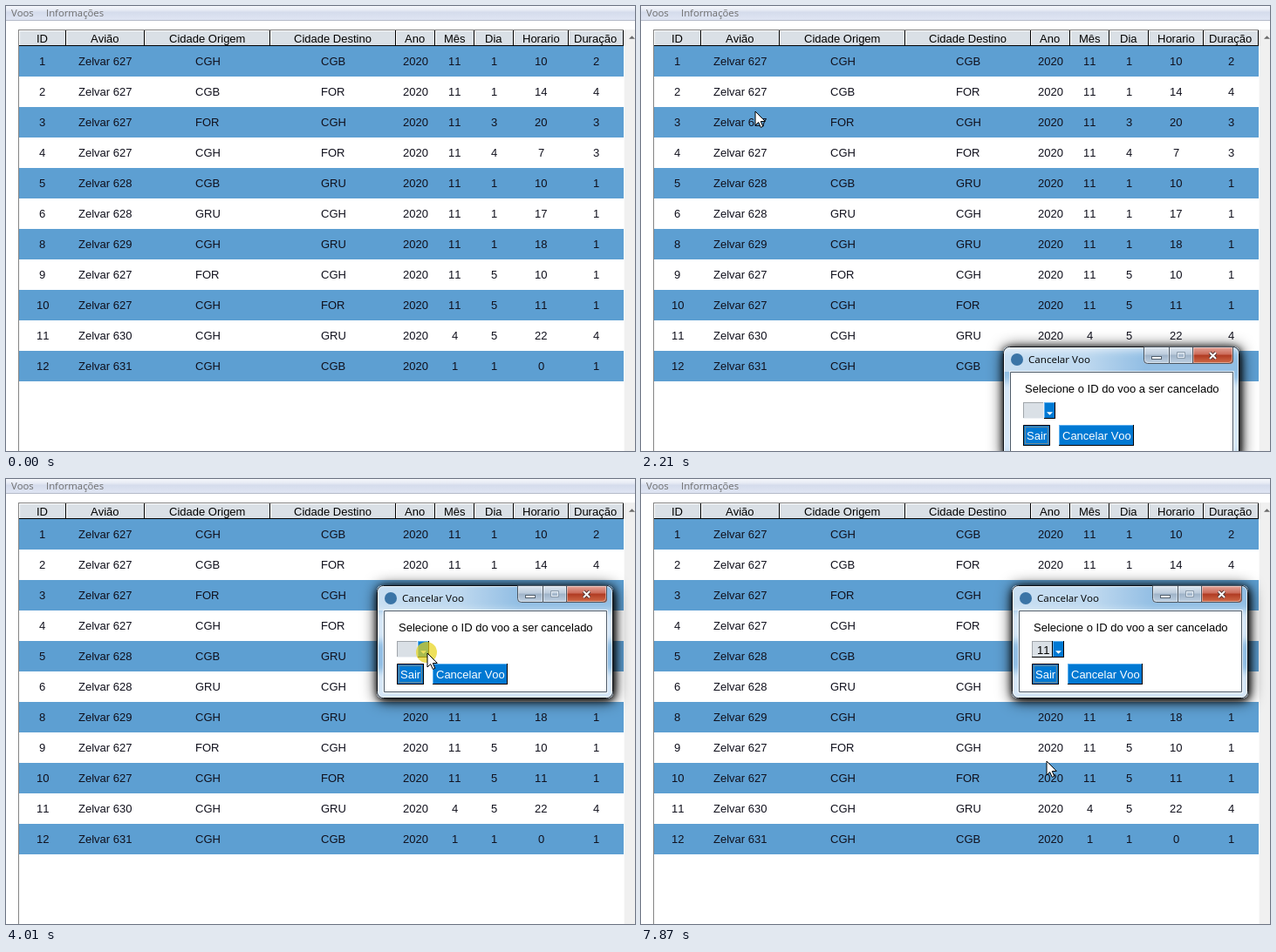
Write an HTML page with a canvas that moves like this. It is 721 px wide and 511 px high and loops after 8 s.

```html
<!DOCTYPE html>
<html lang="pt">
<head>
<meta charset="utf-8">
<title>Voos</title>
<style>
html, body { margin: 0; width: 100%; height: 100%; overflow: hidden; background: #fff; }
canvas { display: block; }
</style>
</head>
<body>
<canvas id="stage" width="721" height="511"></canvas>
<script>
const ctx = document.getElementById('stage').getContext('2d');
ctx.fontKerning = 'none';
const LOOP = 8000;
const TABLE_FONT = '13px "Liberation Sans", Arial, sans-serif';
const MENU_FONT = '11.3px "Open Sans", "Noto Sans", sans-serif';
const TITLE_FONT = '11.6px "Open Sans", "Noto Sans", sans-serif';
const STRIPE = '#5d9fd2', FIELD = '#dae0e6', BUTTON = '#0079d3', SELECT = '#3399ff';

const edges = [15, 69, 159, 303, 447, 492, 537, 582, 645, 708];
const headers = ['ID', 'Avião', 'Cidade Origem', 'Cidade Destino', 'Ano', 'Mês', 'Dia', 'Horario', 'Duração'];
const flights = `1 627 CGH CGB 11 1 10 2
2 627 CGB FOR 11 1 14 4
3 627 FOR CGH 11 3 20 3
4 627 CGH FOR 11 4 7 3
5 628 CGB GRU 11 1 10 1
6 628 GRU CGH 11 1 17 1
8 629 CGH GRU 11 1 18 1
9 627 FOR CGH 11 5 10 1
10 627 CGH FOR 11 5 11 1
11 630 CGH GRU 4 5 22 4
12 631 CGH CGB 1 1 0 1`.split('\n').map(line => {
  const [id, plane, from, to, ...rest] = line.split(' ');
  return [id, 'Zelvar ' + plane, from, to, '2020', ...rest];
});
const ids = flights.map(f => f[0]);

// Each step: time, pointer x, pointer y, changes. Changes persist, except "press".
const YELLOW = 'rgba(232,212,28,.72)', ORANGE = 'rgba(255,186,58,.75)';
const steps = [
  [0, -50, -50, {}],
  [380, 616, 452],
  [590, 500, 335],
  [790, 330, 190],
  [1000, 150, 68],
  [1200, 30, 10],
  [1410, 24, 8, { menu: true, press: YELLOW }],
  [1590, 48, 47],
  [1790, 65, 71],
  [2010, 65, 71, { press: YELLOW }],
  [2200, 130, 120, { menu: false, dialog: [416, 392] }],
  [2400, 390, 330],
  [2590, 496, 406],
  [2810, 487, 352, { drag: true, press: YELLOW }],
  [3010, 494, 250, { press: ORANGE }],
  [3230, 502, 164, { press: ORANGE }],
  [3430, 506, 137, { press: ORANGE }],
  [3620, 498, 160, { drag: false }],
  [3810, 482, 199],
  [4010, 482, 199, { press: YELLOW }],
  [4210, 481, 205, { list: true }],
  [4410, 477, 245],
  [4620, 475, 268, { press: YELLOW }],
  [4820, 475, 290, { scroll: 1, press: ORANGE }],
  [5020, 475, 297],
  [5240, 475, 231],
  [5440, 465, 368],
  [5840, 465, 350],
  [6040, 465, 312],
  [6240, 465, 268],
  [6440, 465, 236],
  [6640, 465, 262],
  [6840, 465, 292],
  [7070, 465, 325],
  [7270, 465, 350],
  [7470, 465, 350, { press: YELLOW }],
  [7670, 464, 346, { list: false, value: '11' }],
  [7870, 464, 323],
];
let last = { scroll: 0, value: '' };
const states = steps.map(([time, x, y, changes]) => {
  last = { ...last, press: null, ...changes, time, x, y };
  if (last.drag) last.dialog = [x - 80, y - 14];
  return last;
});

function rect(x, y, w, h, fill) {
  ctx.fillStyle = fill;
  ctx.fillRect(x, y, w, h);
}
function frame(x, y, w, h, stroke, radius = 0) {
  ctx.strokeStyle = stroke;
  ctx.lineWidth = 1;
  ctx.beginPath();
  ctx.roundRect(x + .5, y + .5, w - 1, h - 1, radius);
  ctx.stroke();
}
function bevel(x, y, w, h, light, dark) {
  rect(x, y, w, 1, light);
  rect(x, y, 1, h, light);
  rect(x, y + h - 1, w, 1, dark);
  rect(x + w - 1, y, 1, h, dark);
}
function fillRound(x, y, w, h, radius, fill) {
  ctx.fillStyle = fill;
  ctx.beginPath();
  ctx.roundRect(x, y, w, h, radius);
  ctx.fill();
}
function text(str, x, y, fill = '#000', font = TABLE_FONT) {
  ctx.font = font;
  ctx.fillStyle = fill;
  ctx.fillText(str, x, y);
}
function centered(str, x, y, fill) {
  ctx.font = TABLE_FONT;
  text(str, Math.round(x - ctx.measureText(str).width / 2), y, fill);
}
function shape(points, fill, stroke) {
  ctx.beginPath();
  points.forEach(([x, y]) => ctx.lineTo(x, y));
  ctx.closePath();
  ctx.fillStyle = fill;
  ctx.fill();
  if (stroke) {
    ctx.strokeStyle = stroke;
    ctx.lineWidth = 1;
    ctx.stroke();
  }
}
function triangle(x, y, r, up, fill) {
  const s = up ? -1 : 1;
  shape([[x - r, y - s * r / 2], [x + r, y - s * r / 2], [x, y + s * r / 2]], fill);
}
function gradient(y0, y1, ...stops) {
  const g = ctx.createLinearGradient(0, y0, 0, y1);
  stops.forEach(([at, color]) => g.addColorStop(at, color));
  return g;
}
function translated(x, y, draw) {
  ctx.save();
  ctx.translate(x, y);
  draw();
  ctx.restore();
}

function drawStripes() {
  rect(0, 17, 721, 494, '#fff');
  flights.forEach((_, i) => { if (i % 2 === 0) rect(15, 46 + i * 35, 693, 35, STRIPE); });
}

function drawTable() {
  drawStripes();
  rect(14, 27, 1, 484, '#848484');
  rect(14, 27, 694, 1, '#848484');
  headers.forEach((name, c) => {
    const x = edges[c], w = edges[c + 1] - x, mid = x + w / 2;
    rect(x, 28, w, 18, FIELD);
    bevel(x, 28, w, 18, '#fff', '#000');
    centered(name, mid - .5, 42);
    flights.forEach((row, r) => centered(row[c], mid, 68 + r * 35, '#10101c'));
  });
  rect(708, 27, 13, 484, '#f0f0f0');
  rect(708, 27, 1, 484, '#fafafa');
  triangle(717.5, 36, 3.5, true, '#6a6a6a');
}

function drawMenuBar(open) {
  rect(0, 0, 721, 16, gradient(0, 16, [0, '#f6f8fc'], [.3, '#e6eaf4'], [.45, '#d5dcec'], [1, '#dfe5f3']));
  rect(0, 16, 721, 1, '#b4bac8');
  if (open) {
    fillRound(1, 0, 37, 16, 2, gradient(0, 16, [0, '#d3d8e2'], [1, '#b9c0ce']));
    frame(1, 0, 37, 17, '#5f6675', 2);
  }
  const color = open ? '#000' : '#6d6d6d';
  text('Voos', 6, 12, color, MENU_FONT);
  text('Informações', 46, 12, color, MENU_FONT);
}

function drawMenu(pointerY) {
  ctx.save();
  ctx.shadowColor = 'rgba(0,0,0,.65)';
  ctx.shadowBlur = 4;
  ctx.shadowOffsetX = ctx.shadowOffsetY = 3;
  rect(0, 17, 146, 63, '#f0f0f0');
  ctx.restore();
  frame(0, 17, 146, 63, '#979797');
  const hover = Math.floor((pointerY - 20) / 19);
  ['Cadastrar novo voo', 'Planilha de voos', 'Cancelar voo'].forEach((label, i) => {
    if (i === hover) rect(2, 20 + i * 19, 141, 19, SELECT);
    text(label, 23, 34 + i * 19, i === hover ? '#fff' : '#000', MENU_FONT);
  });
}

function drawGlass(x, y, w, h) {
  ctx.save();
  ctx.shadowColor = '#000';
  ctx.shadowOffsetX = 1;
  ctx.shadowOffsetY = 2;
  for (const blur of [8, 18]) {
    ctx.shadowBlur = blur;
    fillRound(x, y, w, h, 7, '#cfe0f0');
  }
  ctx.restore();

  ctx.save();
  ctx.beginPath();
  ctx.roundRect(x, y, w, h, 7);
  ctx.clip();
  ctx.filter = 'blur(4px)';
  drawStripes();
  ctx.filter = 'none';
  rect(x, y, w, h, 'rgba(184,214,242,.58)');
  const glow = ctx.createLinearGradient(x, 0, x + w, 0);
  glow.addColorStop(0, 'rgba(255,255,255,.5)');
  glow.addColorStop(.35, 'rgba(255,255,255,.4)');
  glow.addColorStop(.6, 'rgba(255,255,255,0)');
  rect(x, y, w, 29, glow);
  ctx.restore();
  frame(x, y, w, h, '#0c1016', 7);
  frame(x + 1, y + 1, w - 2, h - 2, 'rgba(255,255,255,.65)', 6);
}

function drawCaptionButtons() {
  const plain = gradient(0, 18, [0, '#dce6f0'], [.45, '#bccbdb'], [.5, '#9fb3c8'], [1, '#bed0e2']);
  const red = gradient(0, 18, [0, '#e3a398'], [.45, '#cc6a58'], [.5, '#b03a22'], [1, '#cf6a48']);
  [[160, 30, plain, [0, 0, 0, 4]], [189, 28, plain, 0], [216, 47, red, [0, 0, 4, 0]]].forEach(([x, w, fill, r]) => {
    fillRound(x, 0, w, 19, r, fill);
    frame(x, -1, w, 20, '#4b5662', r);
    frame(x + 1, 0, w - 2, 18, 'rgba(255,255,255,.4)', r);
  });
  rect(169, 10, 12, 4, '#53606d');
  rect(170, 11, 10, 2, '#fff');
  frame(198, 5, 10, 8, '#8b9bab');
  frame(199, 6, 8, 6, '#e4ecf4');
  [['#5b3430', 4], ['#fff', 2]].forEach(([color, width]) => {
    ctx.strokeStyle = color;
    ctx.lineWidth = width;
    ctx.beginPath();
    ctx.moveTo(236, 6); ctx.lineTo(243, 13);
    ctx.moveTo(243, 6); ctx.lineTo(236, 13);
    ctx.stroke();
  });
}

function drawButton(label, x, w, focused) {
  rect(x, 89, w, 24, BUTTON);
  bevel(x, 89, w, 24, '#5fb0ee', '#000');
  if (focused) {
    frame(x, 89, w, 24, '#000');
    ctx.setLineDash([1, 1]);
    frame(x + 2, 91, w - 4, 20, '#e09a50');
    ctx.setLineDash([]);
  }
  centered(label, x + w / 2, 106, '#fff');
}

function drawDialog({ dialog: [x, y], value }) {
  drawGlass(x - 1, y - 1, 271, 130);
  translated(x, y, () => {
    ctx.fillStyle = '#3a74a6';
    ctx.beginPath();
    ctx.arc(15, 14, 7, 0, 7);
    ctx.fill();
    text('Cancelar Voo', 28, 18, '#000', TITLE_FONT);
    drawCaptionButtons();

    frame(6, 27, 258, 96, 'rgba(255,255,255,.7)');
    rect(7, 28, 256, 94, '#fff');
    frame(7, 28, 256, 94, '#4d5b69');
    text('Selecione o ID do voo a ser cancelado', 24, 52);

    rect(22, 63, 37, 19, FIELD);
    bevel(22, 63, 24, 19, '#a0a5aa', value ? '#000' : '#eef1f4');
    rect(46, 63, 13, 19, BUTTON);
    bevel(46, 63, 13, 19, '#5fb0ee', '#000');
    triangle(52.5, 76, 3.5, false, '#fff');
    centered(value, 35.5, 78);

    drawButton('Sair', 22, 31, true);
    drawButton('Cancelar Voo', 63, 86);
  });
}

function drawList({ x, y, scroll }) {
  rect(448, 206, 38, 174, '#fff');
  frame(448, 206, 38, 174, '#000');
  const hover = x < 471 ? Math.floor((y - 208) / 17) : -1;
  ids.slice(scroll, scroll + 10).forEach((id, i) => {
    if (i === hover) rect(450, 208 + i * 17, 20, 17, SELECT);
    centered(id, 461, 221 + i * 17, i === hover ? '#fff' : '#000');
  });
  rect(470, 207, 15, 172, '#c3c3c3');
  [[208, 10], [218 + scroll * 12, 137], [367, 11]].forEach(([top, h]) => {
    rect(471, top, 13, h, '#f0f0f0');
    bevel(471, top, 13, h, '#fff', '#696969');
  });
  triangle(477.5, 213, 4, true, '#000');
  triangle(477.5, 373, 4, false, '#000');
}

function drawPointer({ x, y, press }) {
  if (press) {
    ctx.fillStyle = press;
    ctx.beginPath();
    ctx.arc(x, y, 12, 0, 7);
    ctx.fill();
  }
  translated(x + 1, y + 1, () => shape(
    [[0, 0], [0, 16], [3.7, 12.6], [6.3, 18.4], [8.8, 17.3], [6.3, 11.6], [11.3, 11.4]], '#fff', '#000'));
}

function render() {
  const now = performance.now() % LOOP;
  const state = states.findLast(s => s.time <= now);
  drawTable();
  drawMenuBar(state.menu);
  if (state.menu) drawMenu(state.y);
  if (state.dialog) drawDialog(state);
  if (state.list) drawList(state);
  drawPointer(state);
  requestAnimationFrame(render);
}
render();
</script>
</body>
</html>
```
